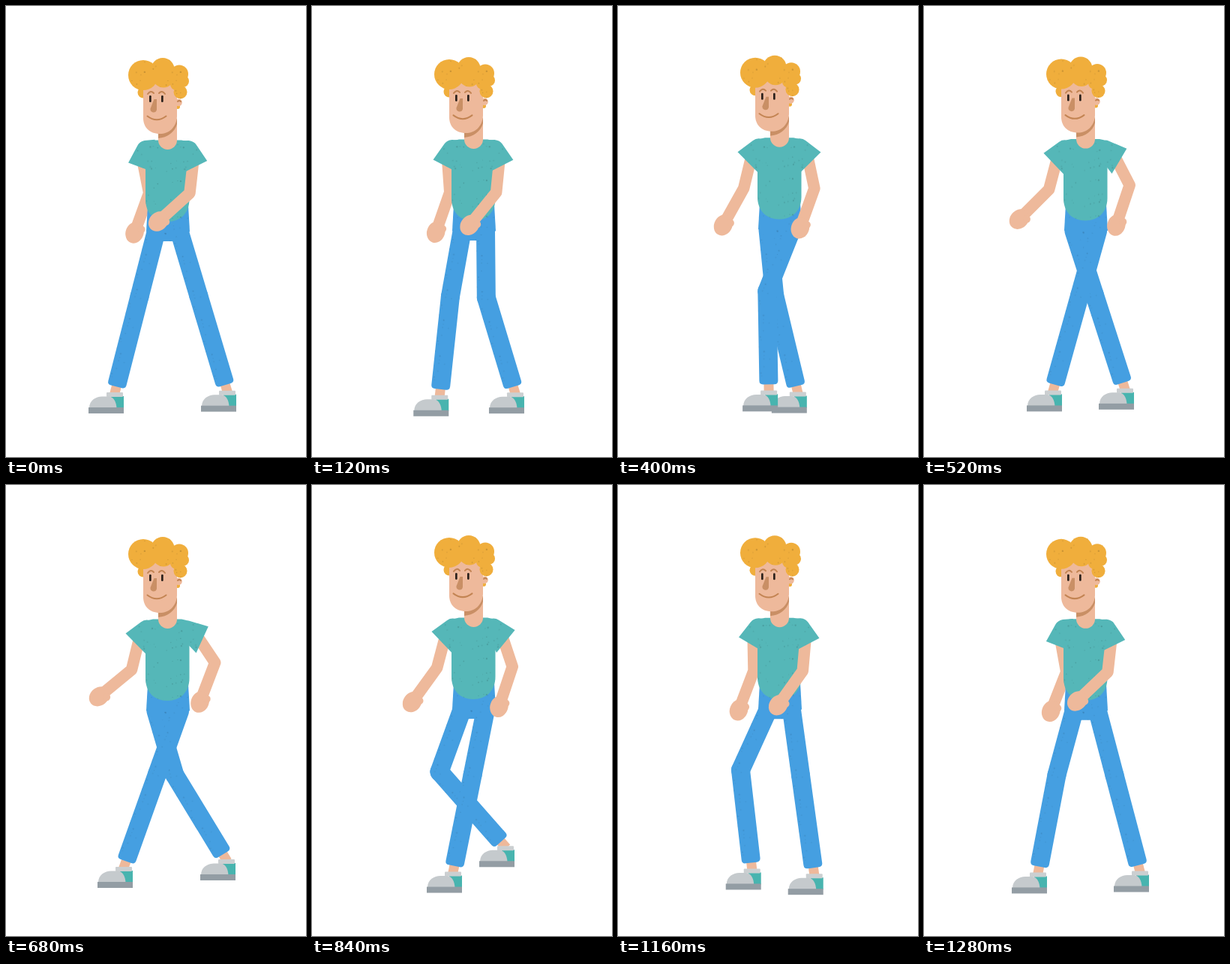
An HTML page for the animation above (1320 ms loop, 400 px wide and 600 px high).

```html
<!DOCTYPE html>
<html lang="en">
<head>
<meta charset="utf-8">
<title>Walk cycle</title>
<style>
  html, body { margin: 0; width: 100%; height: 100%; overflow: hidden; background: #fff; }
  svg { display: block; width: 100%; height: 100%; }
  .skin { fill: #eeb99b; }
  .arm { fill: none; stroke: #eeb99b; stroke-width: 15.5; stroke-linejoin: round; }
  .hair { fill: #f0ae3c; }
  .line { fill: none; stroke: #c38453; stroke-width: 2; stroke-linecap: round; }
  .shade { fill: #c98f65; }
</style>
</head>
<body>
<svg viewBox="0 0 400 600">
  <defs>
    <g id="shoe">
      <rect x="-5" y="4" width="17" height="16" fill="#48b4af"/>
      <rect x="-11" y="-1" width="22" height="6" rx="1" fill="#cbcfd1"/>
      <path d="M-34 20C-34 9 -25 5 -17 4.5H-8C-1 5 2 12 2.500 20Z" fill="#c5cacd"/>
      <rect x="-35" y="19" width="47" height="8" fill="#939da4"/>
    </g>
    <g id="hand" class="skin">
      <ellipse rx="12" ry="14.5"/>
      <circle cx="7" cy="-7" r="5"/>
    </g>
    <path id="sleeve" d="M-14 -16H0Q7 -15 10 -10L24 11.500L-11 28Z"/>
    <g id="leg">
      <rect class="skin" x="-6.500" y="118" width="13" height="17"/>
      <path fill="url(#denim)" d="M-12.500 0a12.500 12.500 0 0 1 25 0V119q0 5 -5 5H-7.500q-5 0 -5 -5Z"/>
    </g>
    <rect id="thigh" x="-12.500" y="-12.500" width="25" height="113" rx="12.500" fill="url(#denim)"/>
  </defs>

  <g id="farArm"><path class="arm"/><use href="#hand"/></g>
  <g id="farLeg"><use href="#leg"/><use href="#thigh"/><use href="#shoe"/></g>
  <path class="bob" fill="url(#denim)" d="M189 265H243L245 300L231 313H200L187 300Z"/>
  <g id="nearLeg"><use href="#leg"/><use href="#thigh"/><use href="#shoe"/></g>

  <g class="bob">
    <path fill="url(#cloth)" d="M186 182Q190 179 196 178.500H234Q240 179 244.500 182V257C244.500 276 232 287 215 287S186 276 186 257Z"/>
    <g id="farSleeve"><use href="#sleeve" transform="scale(-1 1)" fill="url(#cloth)"/></g>
  </g>
  <g id="nearArm"><path class="arm"/><use href="#hand"/></g>
  <g class="bob">
    <g id="nearSleeve"><use href="#sleeve" fill="url(#cloth)"/></g>

    <path class="skin" d="M203 150H228V178.500a12.500 12.500 0 0 1 -25 0Z"/>
    <path class="shade" d="M203 168C216 168 226 160 228 149V157C225 168 215 175 203 176Z"/>
    <circle class="hair" cx="183" cy="115" r="7.500"/>
    <circle class="hair" cx="229" cy="134" r="3"/>
    <circle class="skin" cx="230" cy="128.500" r="4.800"/>
    <path class="line" stroke-width="1.300" d="M229 127q2 -2 4 0"/>
    <path class="skin" d="M183 100H228V147C227 162 217 170 205 170C191 170 183 161 183 149Z"/>
    <g fill="url(#curl)">
      <circle cx="183" cy="92" r="20"/>
      <circle cx="209" cy="84.500" r="15.500"/>
      <circle cx="210" cy="94" r="14.500"/>
      <circle cx="231" cy="90.500" r="12"/>
      <circle cx="236" cy="100" r="8"/>
      <circle cx="227" cy="104" r="8"/>
      <circle cx="232.500" cy="114.500" r="9"/>
    </g>
    <path class="line" d="M189 117Q193 111.500 197 116M204 116Q208 111.500 212 117"/>
    <g fill="#2b211c">
      <rect x="191" y="119" width="2.700" height="9" rx="1.300"/>
      <rect x="207" y="119" width="2.700" height="9" rx="1.300"/>
    </g>
    <path class="shade" d="M197.500 124H201V138Q200 142 196 141.500Q192 140.500 192.500 136.500Z"/>
    <path class="line" d="M188.500 146.500Q201 156 213.500 146.500"/>
  </g>
</svg>
<script>
const LOOP = 1320, STEP = 40, THIGH = 88, SHIN = 133, UPPER = 54, FORE = 56;
const times = [0, 40, 280, 520, 640, 680, 840, 1000, 1280];
const $ = id => document.getElementById(id);
const rad = deg => deg * Math.PI / 180;
const place = (el, x, y, deg = 0) => el.setAttribute('transform', `translate(${x} ${y}) rotate(${deg})`);

// Fabric fills with a sparse seeded grain
let seed = 7;
const rnd = () => (seed = seed * 16807 % 2147483647) / 2147483647;
function fabric(id, color) {
  let dots = '';
  for (let i = 0; i < 16; i++) {
    dots += `<circle cx="${2 + rnd() * 44}" cy="${2 + rnd() * 44}" r="${0.5 + rnd() * 0.7}" opacity="${0.06 + rnd() * 0.1}"/>`;
  }
  document.querySelector('defs').insertAdjacentHTML('beforeend',
    `<pattern id="${id}" width="48" height="48" patternUnits="userSpaceOnUse"><rect width="48" height="48" fill="${color}"/>${dots}</pattern>`);
}
fabric('denim', '#459fe1');
fabric('cloth', '#55b7b8');
fabric('curl', '#f0ae3c');

// Periodic monotone cubic through the shared key times
function track(values) {
  const n = values.length, at = i => (i + n) % n;
  const span = i => (times[i + 1] ?? LOOP) - times[i];
  const slope = values.map((v, i) => (values[at(i + 1)] - v) / span(i));
  const tan = slope.map((b, i) => {
    const a = slope[at(i - 1)];
    return a * b <= 0 ? 0 : 2 * a * b / (a + b);
  });
  return t => {
    let i = n - 1;
    while (times[i] > t) i--;
    const w = span(i), u = (t - times[i]) / w, j = at(i + 1), s = u * u * (3 - 2 * u);
    return values[i] * (1 - s) + values[j] * s
      + w * u * (1 - u) * (tan[i] * (1 - u) - tan[j] * u);
  };
}

const legs = [
  { el: $('farLeg'), hip: 200,
    toe: track([110, 117, 176, 233, 260, 259, 223, 183, 117]),
    bend: track([0, 0, 14.5, 0, 6, 13.8, 53.7, 53.4, 4]) },
  { el: $('nearLeg'), hip: 231.5,
    toe: track([260, 253, 198, 137, 118, 122, 153, 189, 253]),
    bend: track([0, 2, 41.8, 0, 0, 0, 0, 0, 0]) }
];
const arms = [
  { el: $('farArm'), sleeve: $('farSleeve'), x: 186, root: 180,
    upper: track([5, 4, -17, -21, -20, -20, -21, -18, 4]),
    fore: track([-20, -20, -17.5, -45, -51, -50.5, -36, -20, -21.5]) },
  { el: $('nearArm'), sleeve: $('nearSleeve'), x: 244, root: 251,
    upper: track([1, 1, 6.5, 34, 40, 40, 25.5, 7.5, 1]),
    fore: track([-48, -46.5, -23, -18.5, -21, -21, -18.5, -21.5, -46.5]) }
];
const bobbing = document.querySelectorAll('.bob');

// The foot height follows from its x and how far the knee is pushed out
function poseLeg({ el, hip, toe, bend }, t, bob) {
  const [shin, thigh, shoe] = el.children;
  const h = bend(t), x = toe(t) + 35, y0 = 301 + bob, dx = x - hip;
  const reach = Math.sqrt(THIGH ** 2 - h * h) + Math.sqrt(SHIN ** 2 - h * h);
  const dy = Math.sqrt(reach ** 2 - dx * dx);
  const aim = Math.atan2(dx, dy);
  const a = aim - Math.asin(h / THIGH), b = aim + Math.asin(h / SHIN);
  const deg = r => -r * 180 / Math.PI;
  place(thigh, hip, y0, deg(a));
  place(shin, hip + THIGH * Math.sin(a), y0 + THIGH * Math.cos(a), deg(b));
  place(shoe, x, y0 + dy);
}

function poseArm({ el, sleeve, x, root, upper, fore }, t, bob) {
  const [limb, hand] = el.children;
  const a = upper(t), b = fore(t), y = 195 + bob;
  const ex = x + UPPER * Math.sin(rad(a)), ey = y + UPPER * Math.cos(rad(a));
  const hx = ex + FORE * Math.sin(rad(b)), hy = ey + FORE * Math.cos(rad(b));
  limb.setAttribute('d', `M${root} ${y}L${ex} ${ey}L${hx} ${hy}`);
  place(hand, hx, hy, -b);
  place(sleeve, x, 195, -a);
}

function draw(t) {
  const bob = 1.85 * (Math.cos(4 * Math.PI * t / LOOP) - 1);
  bobbing.forEach(el => place(el, 0, bob));
  legs.forEach(leg => poseLeg(leg, t, bob));
  arms.forEach(arm => poseArm(arm, t, bob));
}

const start = performance.now();
function tick() {
  const t = (performance.now() - start) % LOOP;
  draw(Math.floor(t / STEP) * STEP);
  requestAnimationFrame(tick);
}
tick();
</script>
</body>
</html>
```
